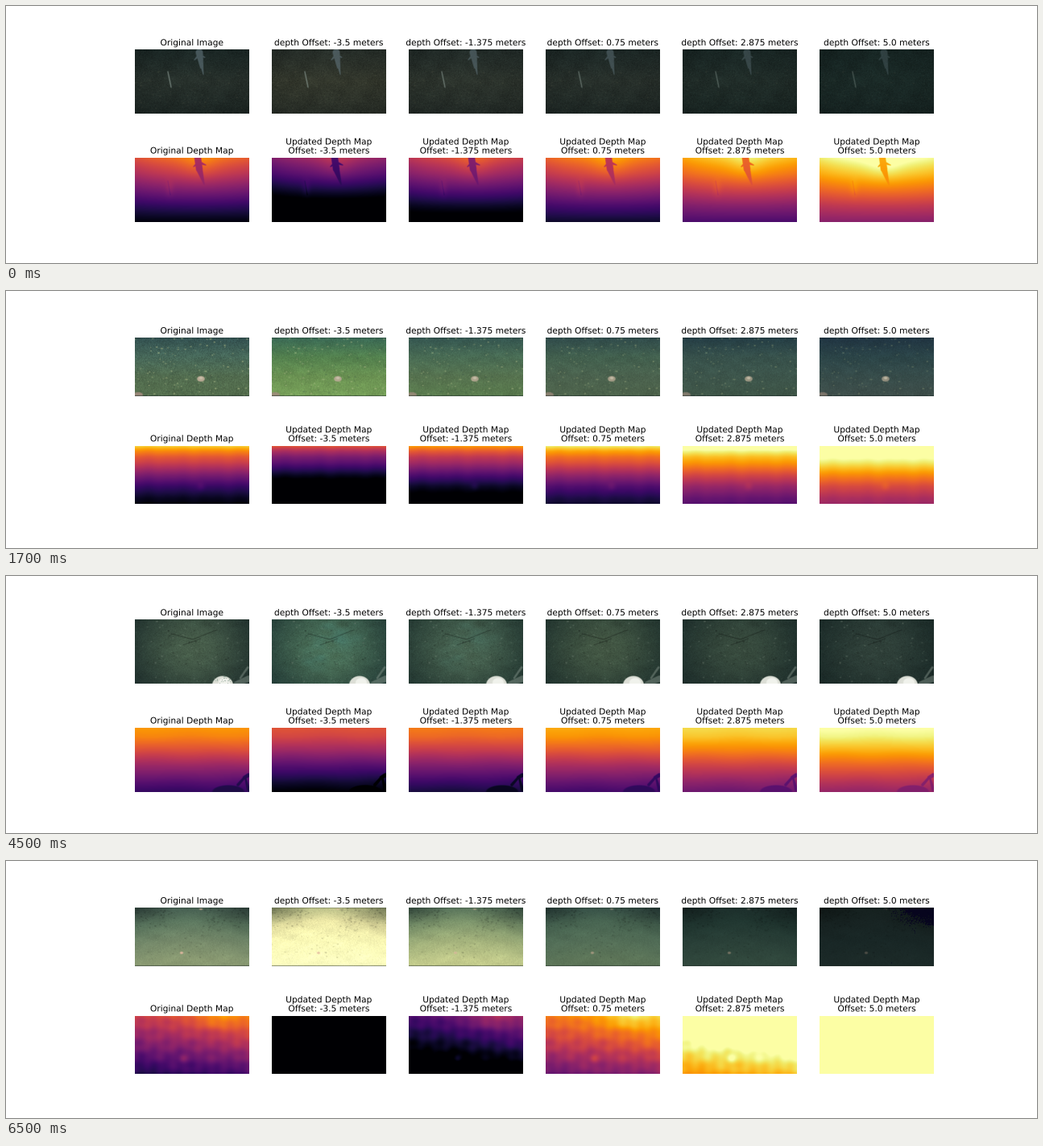
These frames come from a looping animation (1280 by 320 pixels, 8000 ms). A matplotlib script:

```python
import numpy as np
import matplotlib.pyplot as plt
from matplotlib.animation import FuncAnimation
from matplotlib.patheffects import Normal

OFFSETS = [-3.5, -1.375, 0.75, 2.875, 5.0]
W, TALL, WIDE = 142, 80, 72.5
INTERVAL = 500
PAD, LINE = 6, 12.5  # title gap and line pitch, in points


class Field:
    """Panel grid in stage pixels, sampled twice per pixel, with soft masks."""

    def __init__(self, h, seed):
        self.h = h
        self.y, self.x = np.mgrid[0.25:h:0.5, 0.25:W:0.5]
        self.u, self.v = self.x / W, self.y / h
        self.rng = np.random.default_rng(seed)

    def disc(self, cx, cy, rx, ry=None, deg=0):
        ry = ry or rx
        c, s = np.cos(np.radians(deg)), np.sin(np.radians(deg))
        dx, dy = self.x - cx, self.y - cy
        r = np.hypot((dx * c + dy * s) / rx, (dy * c - dx * s) / ry)
        return np.clip((1 - r) * min(rx, ry) + 0.5, 0, 1)

    def glow(self, cx, cy, rx, ry=None):
        ry = ry or rx
        return np.exp(-((self.x - cx) / rx) ** 2 - ((self.y - cy) / ry) ** 2)

    def limb(self, p, q, r0, r1):
        (px, py), (qx, qy) = p, q
        dx, dy = qx - px, qy - py
        t = ((self.x - px) * dx + (self.y - py) * dy) / (dx * dx + dy * dy)
        t = np.clip(t, 0, 1)
        dist = np.hypot(self.x - px - t * dx, self.y - py - t * dy)
        return np.clip(r0 + (r1 - r0) * t - dist + 0.5, 0, 1)

    def specks(self, n, size, box=(0, 0, 1, 1)):
        mask = np.zeros_like(self.x)
        x0, y0, x1, y1 = box
        for _ in range(n):
            cx = self.rng.uniform(x0, x1) * W
            cy = self.rng.uniform(y0, y1) * self.h
            r = size * self.rng.uniform(0.5, 1.2)
            dot = self.disc(cx, cy, r * self.rng.uniform(1, 1.8), r)
            mask = np.maximum(mask, dot * self.rng.uniform(0.4, 1))
        return mask

    def noise(self):
        grain = self.rng.normal(size=(int(np.ceil(self.h)), W))
        return np.kron(grain, np.ones((2, 2)))[:len(self.y)]

    def waves(self, n, freq):
        total = np.zeros_like(self.x)
        for _ in range(n):
            a, b = self.rng.uniform(-freq, freq, 2)
            phase = self.rng.uniform(0, 2 * np.pi)
            total += np.sin(2 * np.pi * (a * self.u + b * self.v) + phase)
        return total / np.sqrt(n)


def rgb(code):
    return np.array([int(code[i:i + 2], 16) for i in (0, 2, 4)]) / 255


def ramp(s, codes):
    cols = np.array([rgb(c) for c in codes.split()])
    pos = np.linspace(0, 1, len(cols))
    return np.dstack([np.interp(s, pos, ch) for ch in cols.T])


def mix(img, code, mask):
    m = mask[..., None]
    return img * (1 - m) + rgb(code) * m


def shade(img, mask):
    return img * (1 + mask[..., None])


def any_of(*masks):
    return np.maximum.reduce(masks)


def vignette(f):
    return (f.u - 0.5) ** 2 + (f.v - 0.5) ** 2


def edges(f):
    return np.maximum(f.y < 0.5, f.y > f.h - 0.8) * 0.55


def shark():
    f = Field(TALL, 3)
    tones = ["1d2a28 28312c 1f2926", "29312c 34382d 2b312a",
             "242e2b 2d342d 252d29", "1f2b29 28302b 202a27",
             "1b2927 212d29 1b2825", "182725 1b2a27 182624"]
    gains = [1, 1, 0.9, 0.8, 0.65, 0.55]
    grain, cloud = f.noise(), f.waves(16, 5)
    dots = f.specks(110, 0.55, (0, 0.3, 1, 1))
    body = any_of(f.limb((80, 4), (83, 22), 4.5, 2.2),
                  f.limb((83, 20), (85, 31), 1.8, 0.6),
                  f.limb((80, 7), (74, 13), 2, 0.6),
                  f.limb((80, 7), (87, 10), 2, 0.6))
    stick = f.limb((41, 28), (45, 47), 0.7, 0.7)
    photos = []
    for tone, gain in zip(tones, gains):
        img = ramp(f.v, tone)
        img = shade(img, 0.07 * grain + 0.04 * cloud - 0.4 * vignette(f))
        img = mix(img, "5a5a48", 0.4 * gain * dots)
        img = mix(img, "62757d", 0.6 * gain * body)
        photos.append(mix(img, "8f9f98", 0.65 * gain * stick))

    t = np.interp(f.v, [0, 0.12, 0.25, 0.5, 0.75, 1],
                  [0.69, 0.61, 0.53, 0.35, 0.17, 0.02])
    t -= 0.3 * (f.u - 0.56) ** 2 * (1 - f.v)
    t += 0.07 * f.glow(81, 4, 22, 22) + 0.04 * f.glow(43, 38, 5, 10)
    fish = any_of(f.limb((78, 0), (80, 14), 4.2, 4.2),
                  f.limb((80, 14), (86, 33), 4, 0.8),
                  f.limb((79, 6), (73, 11), 2.2, 0.6),
                  f.limb((80, 6), (88, 9), 2.2, 0.6))
    t += (0.43 - 0.1 * f.v - t) * 0.9 * fish
    t -= 0.05 * f.limb((41, 29), (44, 46), 0.6, 0.6)
    return f, photos, t, 0.07


def seabed():
    f = Field(WIDE, 8)
    tones = ["325050 48695a 526c4f 556f4e", "3a6955 54824f 6a9152 78a25a",
             "345550 4a6d55 56724f 5b7d4f", "304b4b 43614f 4b624e 4e644c",
             "243d45 38524c 3d554b 3f5648", "203442 2c4548 374c4a 3f4f4b"]
    grain, cloud = f.noise(), f.waves(16, 6)
    light = f.specks(95, 0.75)
    dark = f.specks(60, 0.9)
    shell = f.disc(82, 51, 4.8, 3.4)
    corner = f.disc(4, 71, 6, 3.5)
    photos = []
    for i, tone in enumerate(tones):
        img = ramp(f.v, tone)
        img = shade(img, (0.07 if i == 0 else 0.045) * grain + 0.03 * cloud)
        img = mix(img, "24403c", 0.25 * dark)
        img = mix(img, "b4c08c", (0.75 - 0.08 * i) * light)
        img = mix(img, "b8aa94", (1 - 0.06 * i) * shell)
        img = mix(img, "d6cdb8", 0.6 * f.disc(82, 50, 2.2, 1.5))
        img = mix(img, "a08a7c", (0.9 - 0.06 * i) * corner)
        photos.append(mix(img, "1c2a2a", edges(f)))

    t = np.interp(f.v, [0, 0.04, 0.1, 0.2, 0.3, 0.52, 0.7, 0.9, 1],
                  [0.92, 0.84, 0.74, 0.62, 0.54, 0.33, 0.18, 0.06, 0.02])
    t += 0.004 * np.sin(40 * f.u) + 0.005 * np.sin(23 * f.u + 2)
    t += 0.05 * f.glow(82, 51, 5, 5)
    return f, photos, t, 0.08


def drift():
    f = Field(TALL, 15)
    tones = ["18221f 262d2e 3d3f4b 46434f 4d4751",
             "19231f 2a2f32 424453 4c4657 604b5c",
             "19241f 272f31 3f4450 464656 574b59",
             "18251f 253032 394451 3d4655 47505a",
             "172520 223230 304346 35474f 3d5354",
             "16241f 1e302c 283c3e 2b4042 324a46"]
    grain, cloud = f.noise(), f.waves(8, 1.5)
    sparks = any_of(*[f.disc(x, y, a, b, deg) for x, y, a, b, deg in [
        (56, 18, 0.8, 1.3, 0), (98, 35, 1.9, 0.8, 20), (43, 51, 1.9, 0.9, 0),
        (43, 60, 2.2, 1.1, 10), (39, 59, 1.3, 0.8, 0), (41, 72, 3, 1.3, 8),
        (39, 74, 1, 1.2, 0), (94, 54, 1, 0.6, 0), (87, 77, 1, 0.6, 0),
        (97, 18, 0.8, 0.6, 0), (7, 54, 0.9, 0.6, 0)]])
    s = np.clip(0.5 + 0.42 * (f.u - f.v) + 0.14 * f.u - 0.05
                + 0.03 * cloud, 0, 1)
    photos = []
    for i, tone in enumerate(tones):
        img = shade(ramp(s, tone), (0.13 if i == 0 else 0.025) * grain)
        photos.append(mix(img, "d8736a", (0.95 - 0.06 * i) * sparks))

    t = np.interp(f.u, [0, 0.3, 0.6, 1], [0.72, 0.61, 0.48, 0.4])
    t += 0.02 * f.waves(16, 3.5) - 0.31 * f.v
    t += 0.04 * f.glow(22, 14, 25, 20)
    t += 0.13 * f.glow(100, 36, 6, 5) + 0.08 * f.glow(43, 54, 5, 7)
    t += 0.08 * f.glow(41, 72, 5, 4)
    return f, photos, t, 0.2


def rover():
    f = Field(TALL, 21)
    tones = ["1d2d2b 485e4b", "223a36 4d7158", "20342f 496350",
             "1e302c 435744", "1b2b29 384b3e", "182725 30413a"]
    teal = [0, 0.5, 0.25, 0, 0, 0]
    grain, cloud = f.noise(), f.waves(16, 6)
    patch = np.clip(any_of(f.glow(75, 25, 30, 20), f.glow(55, 50, 15, 12))
                    * (0.75 + 0.4 * cloud), 0, 1)
    dots = f.specks(45, 0.7)
    cracks = any_of(f.limb((45, 18), (72, 25), 0.4, 0.5),
                    f.limb((72, 25), (102, 13), 0.5, 0.4),
                    f.limb((60, 32), (82, 24), 0.4, 0.4))
    dark = any_of(cracks, f.specks(35, 0.7, (0.2, 0.1, 0.85, 0.7)))
    dome = f.disc(109, 82, 13, 11.5)
    arm = any_of(f.limb((126, 80), (141, 74), 3, 4),
                 f.limb((131, 73), (140, 60), 1.2, 1.4))
    s = np.exp(-3.2 * (f.u - 0.5) ** 2 - 1.4 * (f.v - 0.45) ** 2)
    s = 1.35 * s - 0.35
    photos = []
    for i, tone in enumerate(tones):
        img = mix(ramp(s, tone), "42786e", teal[i] * patch)
        img = shade(img, 0.05 * grain + 0.03 * cloud - 0.35 * dark)
        img = mix(img, "8c9c8c", 0.45 * dots)
        img = mix(img, "8b9a90", 0.45 * arm)
        img = mix(img, "dcdfd6", dome)
        img = mix(img, "f6f7f2", 0.8 * f.disc(111, 79, 7, 6))
        if i == 0:
            img = mix(img, "6f8c7c", 0.6 * dome * (grain > 0.8))
        photos.append(img)

    v = f.v + 0.012 * f.waves(12, 2)
    t = np.interp(v, [0, 0.12, 0.35, 0.6, 0.85, 1],
                  [0.77, 0.73, 0.59, 0.41, 0.25, 0.17])
    shadow = any_of(f.disc(116, 80, 20, 8.5),
                    f.limb((128, 71), (136, 62), 1.8, 1.6),
                    f.limb((136, 62), (141, 59), 2.2, 2.5),
                    f.limb((137, 62), (141, 77), 1.2, 2))
    t += (0.11 - t) * 0.85 * shadow
    return f, photos, t, 0.047


def sand():
    f = Field(WIDE, 34)
    tones = ["3e574f 5c7860 75896a 8a9a72", "a9b47f efeaa8 fffdb9 ffffc0",
             "4b6a58 7b946c a3b27c c3cb8c", "324c47 486552 546f58 5d7558",
             "1c2e2c 213731 2a4038 31483d", "162220 182423 192726 1c2a28"]
    grain, cloud = f.noise(), f.waves(16, 5)
    flecks = any_of(f.specks(45, 0.9, (0, 0.02, 0.35, 0.35)),
                    f.specks(60, 0.9, (0.6, 0, 1, 0.4)),
                    f.specks(30, 0.7, (0.1, 0.4, 0.8, 0.85)))
    corners = any_of(f.glow(0, 0, 40, 18), f.glow(142, 0, 45, 24))
    spot = f.disc(58, 56, 2, 1.5)
    bow = np.clip(f.v + 0.12 - 0.5 * (f.u - 0.5) ** 2, 0, 1)
    photos = []
    for i, tone in enumerate(tones):
        img = shade(ramp(bow, tone),
                    0.025 * grain + 0.02 * cloud - 0.28 * corners)
        img = shade(img, -0.24 * flecks)
        img = mix(img, "e0b8a0", (0.9 - 0.13 * i) * spot)
        img = mix(img, "e0b8a0", (0.7 - 0.11 * i) * f.disc(82, 2, 2, 0.9))
        if i == 5:
            navy = f.glow(142, 0, 50, 24) + 0.12 * grain + 0.08 * cloud
            img = mix(img, "06031f", 0.9 * (navy > 0.5))
        photos.append(mix(img, "2a3530", edges(f)))

    t = 0.54 + 0.2 * f.u - f.v * (0.42 + 0.11 * f.u)
    t += 0.012 * np.cos(2 * np.pi * 9 * f.u) + 0.007 * np.cos(34 * f.v)
    t += 0.014 * f.waves(14, 5)
    t += 0.09 * f.glow(105, 4, 22, 12) + 0.08 * f.glow(60, 54, 5, 5)
    return f, photos, t, 0.225


def panels(build):
    f, photos, t, gain = build()
    maps = [plt.cm.inferno(np.clip(t + gain * o, 0, 1))[..., :3]
            for o in [0] + OFFSETS]
    return f.h, [np.clip(p, 0, 1) for p in photos] + maps


def caption(ax, text):
    # drawn as outlines, so that lines sit at fractions of a pixel
    for i, line in enumerate(reversed(text.split("\n"))):
        ax.annotate(line, (0.5, 1), (0, PAD + i * LINE),
                    xycoords="axes fraction", textcoords="offset points",
                    ha="center", va="baseline", fontsize=12,
                    path_effects=[Normal()])


SCENES = [panels(b) for b in (shark, seabed, drift, rover, sand)]
TITLES = (["Original Image"] + [f"depth Offset: {o} meters" for o in OFFSETS]
          + ["Original Depth Map"]
          + [f"Updated Depth Map\nOffset: {o} meters" for o in OFFSETS])

plt.rcParams["font.family"] = "DejaVu Sans"
fig, axes = plt.subplots(2, 6, figsize=(20, 5), dpi=64)
images = []
for ax, title, pic in zip(axes.flat, TITLES, SCENES[0][1]):
    images.append(ax.imshow(pic, extent=(0, W, TALL, 0)))
    caption(ax, title)
    ax.axis("off")


def update(k):
    # the first scene holds one step, the others up to four
    h, pics = SCENES[(k + 3) // 4]
    for im, pic in zip(images, pics):
        im.set_data(pic)
        im.set_extent((0, W, h, 0))
    return images


anim = FuncAnimation(fig, update, frames=16, interval=INTERVAL, repeat=True)
plt.show()
```
